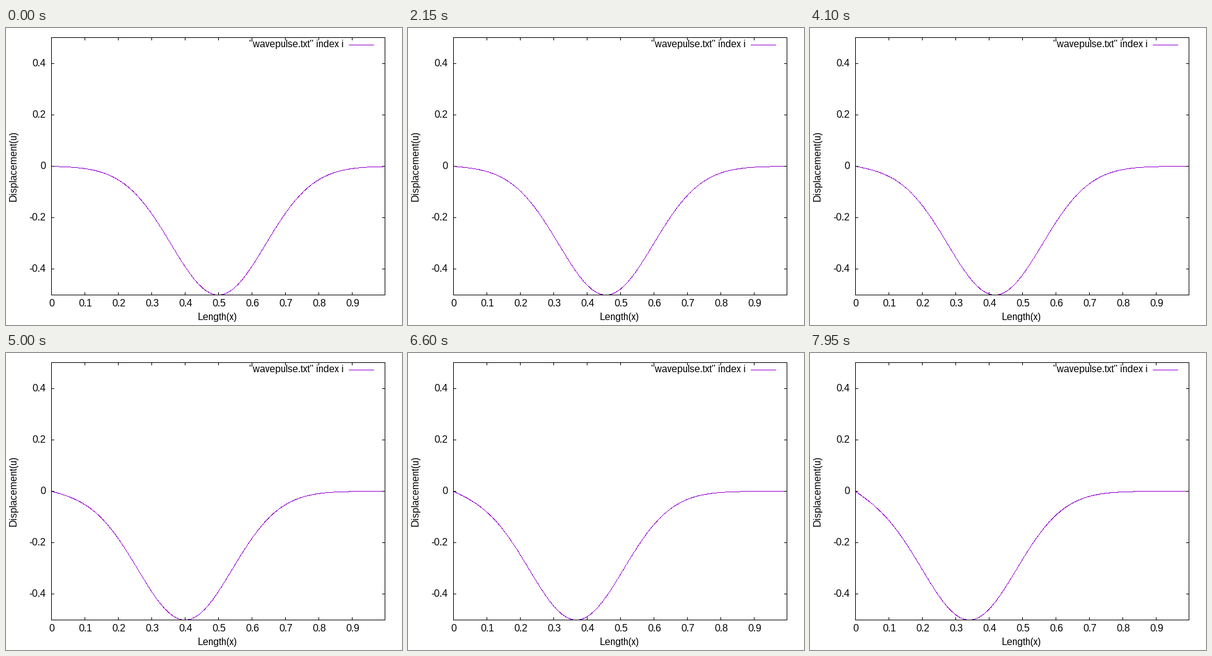
Animation, 640 px wide and 480 px high, one loop 8000 ms. Source, as a matplotlib script:

```python
import numpy as np
import matplotlib.pyplot as plt
from matplotlib.animation import FuncAnimation
from matplotlib.collections import LineCollection
from matplotlib.patches import Rectangle

W, H, DPI = 640, 480, 100
LEFT, RIGHT, TOP, BOTTOM = 73, 612, 15, 431
ZERO = 223
X_UNIT = (RIGHT - LEFT) / 0.999
Y_UNIT = BOTTOM - TOP
TICK = 5
FRAMES, INTERVAL = 160, 50
STEP = 0.001
PURPLE = "#9400d3"

# Whole-pixel glyph advances, as in a hinted bitmap plot
plt.rcParams["text.hinting"] = "default"
plt.rcParams["text.hinting_factor"] = 1
plt.rcParams["font.family"] = "Liberation Sans"
plt.rcParams["font.size"] = 16 * 72 / DPI

fig = plt.figure(figsize=(W / DPI, H / DPI), dpi=DPI, facecolor="white")
ax = fig.add_axes([0, 0, 1, 1])
ax.set_xlim(0, W)
ax.set_ylim(H, 0)
ax.axis("off")


def bar(x, y, w, h, color="black"):
    ax.add_patch(Rectangle((x, y), w, h, facecolor=color, linewidth=0,
                           antialiased=False, zorder=3))


def label(x, y, text, ha="center", **kw):
    ax.text(x, y, text, ha=ha, va="baseline", color="black", zorder=4, **kw)


def draw_frame():
    for y in (TOP, BOTTOM):
        bar(LEFT, y, RIGHT - LEFT + 1, 1)
    for x in (LEFT, RIGHT):
        bar(x, TOP, 1, BOTTOM - TOP + 1)
    for k in range(10):
        x = round(LEFT + k / 10 * X_UNIT)
        bar(x, BOTTOM - TICK + 1, 1, TICK)
        bar(x, TOP, 1, TICK)
        label(x + 1, 450, f"{k / 10:g}")
    for k in range(-2, 3):
        y = round(ZERO - k / 5 * Y_UNIT)
        bar(LEFT, y, TICK, 1)
        bar(RIGHT - TICK + 1, y, TICK, 1)
        label(64, y + 5, f"{k / 5:g}", ha="right")
    label(342, 472, "Length(x)")
    label(17, 223, "Displacement(u)", rotation=90, rotation_mode="anchor")
    label(546, 31, '"wavepulse.txt" index i', ha="right")
    bar(554, 27, 41, 1, PURPLE)


def pulse(x, centre):
    """Pulse moving left, with its inverted reflection at the fixed end."""
    return -0.5 * (np.exp(-25 * (x - centre) ** 2)
                   - np.exp(-25 * (x + centre) ** 2))


draw_frame()
xs = np.arange(1000) * STEP
cols = LEFT + np.floor(xs * X_UNIT + 0.5)
curve = LineCollection([], linewidths=72 / DPI, antialiaseds=False,
                       colors=PURPLE, capstyle="butt", zorder=2)
curve.set_snap(False)
ax.add_collection(curve, autolim=False)


def update(i):
    # One pixel per sample; neighbouring samples always touch
    rows = ZERO - np.floor(Y_UNIT * pulse(xs, 0.5 - STEP * i) + 0.5)
    tops = np.column_stack([cols + 0.5, rows])
    curve.set_segments(np.stack([tops, tops + [0, 1]], axis=1))
    return (curve,)


anim = FuncAnimation(fig, update, frames=FRAMES, interval=INTERVAL,
                     repeat=True, repeat_delay=0)
plt.show()
```
